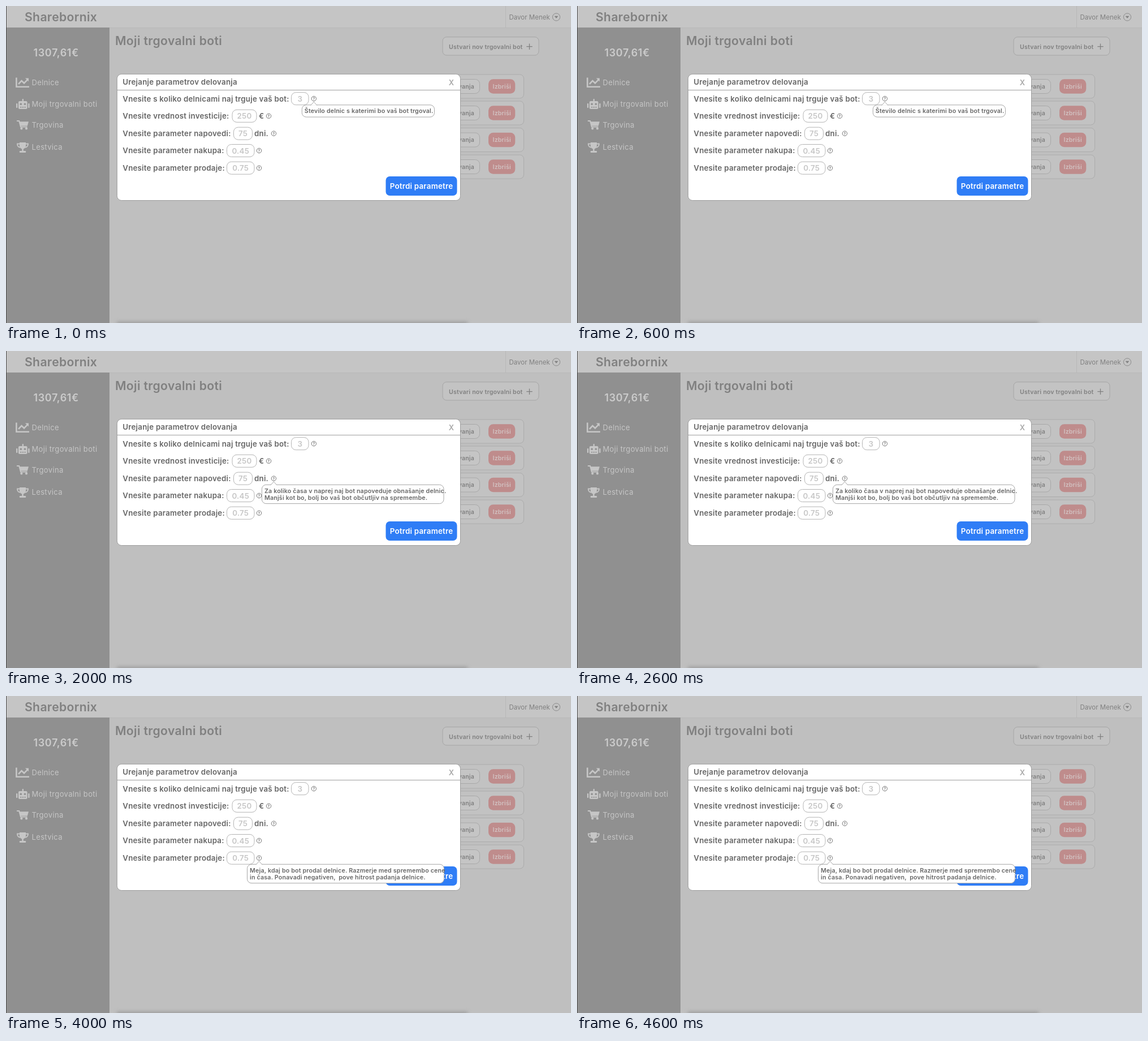
Recreate the animation shown at these times as an HTML page. Size 999 px wide and 560 px high, loop 5000 ms.

```html
<!DOCTYPE html>
<html lang="sl">
<head>
<meta charset="utf-8">
<title>Trgovalni boti</title>
<style>
  html, body { margin: 0; width: 100%; height: 100%; overflow: hidden; background: #bfbfbf; }
  svg { display: block; width: 999px; height: 560px; }
  text {
    font-family: Inter, Roboto, sans-serif; font-weight: 600; font-optical-sizing: none;
    letter-spacing: .015em; white-space: pre;
  }
  .menu { font-weight: 400; letter-spacing: .35px; }
  .plain { font-weight: 400; letter-spacing: 0; }
  .sum { letter-spacing: .65px; }
</style>
</head>
<body>
<svg id="stage" viewBox="0 0 999 560"></svg>
<script>
const text = (x, y, size, fill, str, attrs = '') =>
  `<text x="${x}" y="${y}" font-size="${size}" fill="${fill}" ${attrs}>${str}</text>`;
const box = (x1, y1, x2, y2, r, fill, stroke = 'none') =>
  `<rect x="${x1}" y="${y1}" width="${x2 - x1}" height="${y2 - y1}" rx="${r}" fill="${fill}" stroke="${stroke}"/>`;
const path = (d, fill, stroke = 'none', width = 1) =>
  `<path d="${d}" fill="${fill}" stroke="${stroke}" stroke-width="${width}"/>`;

const DARK = '#666', SOFT = '#c6c6c6', TITLE = '#808080';
const middle = 'text-anchor="middle"', end = 'text-anchor="end"';

// label, input left, input right, value, suffix, suffix x, help x, centre y, tip right edge, tip lines
const params = [
  ['Vnesite s koliko delnicami naj trguje vaš bot:', 504.5, 535, '3', '', 0, 544.3, 163.7, 757.5,
    ['Število delnic s katerimi bo vaš bot trgoval.']],
  ['Vnesite vrednost investicije:', 400, 443, '250', '€', 447, 464.5, 194.3, 750,
    ['Koliko denarja boste namenili svojemu botu za trgovanje.']],
  ['Vnesite parameter napovedi:', 402.5, 435.5, '75', 'dni.', 439, 473.4, 225.2, 774,
    ['Za koliko časa v naprej naj bot napoveduje obnašanje delnic.',
     'Manjši kot bo, bolj bo vaš bot občutljiv na spremembe.']],
  ['Vnesite parameter nakupa:', 390.5, 439, '0.45', '', 0, 447.5, 255.5, 767,
    ['Meja, kdaj bo bot kupil delnice. Razmerje med spremembo cene',
     'in časa. Ponavadi pozitiven, pove hitrost naraščanja delnice.']],
  ['Vnesite parameter prodaje:', 390.5, 439, '0.75', '', 0, 447.5, 286.2, 774.5,
    ['Meja, kdaj bo bot prodal delnice. Razmerje med spremembo cene',
     'in časa. Ponavadi negativen,  pove hitrost padanja delnice.']]
];

const header = () =>
  box(0, 0, 999, 38, 0, '#c5c5c5') +
  path('M183 38.5H999M883.5 0V38', 'none', '#b8b8b8') +
  text(33, 27.2, 21.2, TITLE, 'Sharebornix') +
  text(889.5, 23.8, 11.5, TITLE, 'Davor Menek', 'class="plain"') +
  '<circle cx="973" cy="19.5" r="6.6" fill="none" stroke="#8b8b8b"/>' +
  path('M969.6 17.8h6.8l-3.4 4z', TITLE);

const sidebar = () => {
  const items = [['Delnice', 135], ['Moji trgovalni boti', 173], ['Trgovina', 210], ['Lestvica', 249]];
  const chart = path('M18.4 126.5V142.8H41', 'none', SOFT, 2.6) +
    path('M22 138l5.5-6 4.5 4.3 5.5-5.6', 'none', SOFT, 2.6) + path('M34 127.5h6v6z', SOFT);
  const robot = box(22, 168, 37.6, 182, 2.2, SOFT) + box(28.7, 164, 31, 169, 1, SOFT) +
    box(18, 172, 20.4, 180, 1, SOFT) + box(39.2, 172, 41.6, 180, 1, SOFT) +
    '<g fill="#909090"><circle cx="26.3" cy="173.3" r="1.8"/><circle cx="33.4" cy="173.3" r="1.8"/></g>' +
    path('M25 178.8h2.4m1.3 0h2.4m1.3 0h2.4', 'none', '#909090', 1.5);
  const cart = path('M19 203h4.2l2.8 10.6h11.5', 'none', SOFT, 2) +
    path('M23.8 204.2H40l-2.2 7.6H25.6z', SOFT) +
    `<g fill="${SOFT}"><circle cx="27.4" cy="216.4" r="2.1"/><circle cx="36" cy="216.4" r="2.1"/></g>`;
  const cup = path('M24 241h11v6a5.5 5.5 0 0 1-11 0z', SOFT) +
    path('M24 243.5h-4c0 3.5 2 5.8 5 6.2M35 243.5h4c0 3.5-2 5.8-5 6.2', 'none', SOFT, 1.9) +
    box(28.2, 250, 30.8, 257, 0, SOFT) + box(23.8, 256, 35.2, 259, 1, SOFT);
  return box(0, 38, 183, 560, 0, '#909090') +
    text(48.5, 89.2, 18, '#cbcbcb', '1307,61€', 'class="sum"') +
    chart + robot + cart + cup +
    items.map(([label, y]) => text(45.5, y + 5, 13, SOFT, label, 'class="menu"')).join('');
};

const page = () =>
  text(193, 69.2, 21.2, TITLE, 'Moji trgovalni boti') +
  box(772, 54.8, 942, 87, 7, '#c3c3c3', '#a6a6a6') +
  text(783, 76.2, 10.7, TITLE, 'Ustvari nov trgovalni bot') +
  path('M920.3 71.7h10.4m-5.2-5.2v10.4', 'none', TITLE, 1.3) +
  [142, 189, 236.5, 284].map(y =>
    box(205, y - 21, 915.5, y + 21, 7, '#c2c2c2', '#acacac') +
    box(700, y - 12.5, 837.5, y + 12.5, 8, '#c5c5c5', '#a8a8a8') +
    text(828, y + 3.8, 10.6, TITLE, 'delovanja', end) +
    box(853, y - 12.8, 900.3, y + 12.8, 8.5, '#bf8c8c') +
    text(876.7, y + 3.8, 10.6, '#d2c2c2', 'Izbriši', middle)).join('');

const param = ([label, x1, x2, value, suffix, suffixX, helpX, y]) =>
  text(206.3, y + 4.9, 13.35, DARK, label) +
  box(x1, y - 11, x2, y + 11, 8, '#fff', '#b4b4b4') +
  text((x1 + x2) / 2, y + 5, 13.4, '#c6c6c6', value, middle) +
  text(suffixX, y + 4.9, 13.35, DARK, suffix) +
  `<circle cx="${helpX}" cy="${y}" r="4.2" fill="#fff" stroke="${DARK}" stroke-width=".9"/>` +
  text(helpX, y + 2.5, 6.8, DARK, '?', middle);

const modal = () =>
  box(196.3, 120.3, 803.5, 343.5, 8, '#fff', '#9c9c9c') +
  path('M196.3 148.6H803.5', 'none', '#9c9c9c') +
  text(206.3, 139.4, 13.35, DARK, 'Urejanje parametrov delovanja') +
  text(787.5, 139.7, 13, '#a8a8a8', 'X', middle) +
  params.map(param).join('') +
  box(671.5, 301, 797.5, 335, 7, '#2f7df6') +
  text(734.5, 323.4, 13.4, '#fff', 'Potrdi parametre', middle);

const tip = p => {
  const [x, y, right, lines] = p.slice(6);
  const left = x - 21, top = y + 11.1, bottom = top + 9.3 + 12 * lines.length;
  return '<g class="tip">' +
    box(left, top, right, bottom, 7.5, '#fff', '#a6a6a6') +
    path(`M${x - 5.5} ${top + .6}l5.5-6 5.5 6`, '#fff', '#a6a6a6') +
    lines.map((line, i) => text(left + 4.5, top + 14.6 + 12 * i, 10.7, DARK, line)).join('') +
    '</g>';
};

const shadow = '<rect x="196" y="558" width="620" height="8" fill="#999" style="filter:blur(3px)"/>';

stage.innerHTML = box(0, 0, 999, 560, 0, '#bfbfbf') + shadow + header() + sidebar() + page() +
  box(0, 0, 1, 560, 0, '#4c4c4c') + modal() + params.map(tip).join('');

const tips = document.querySelectorAll('.tip');
const start = performance.now();
function draw() {
  const current = Math.floor((performance.now() - start) / 1000) % tips.length;
  tips.forEach((el, i) => el.setAttribute('visibility', i === current ? 'visible' : 'hidden'));
  requestAnimationFrame(draw);
}
draw();
</script>
</body>
</html>
```
